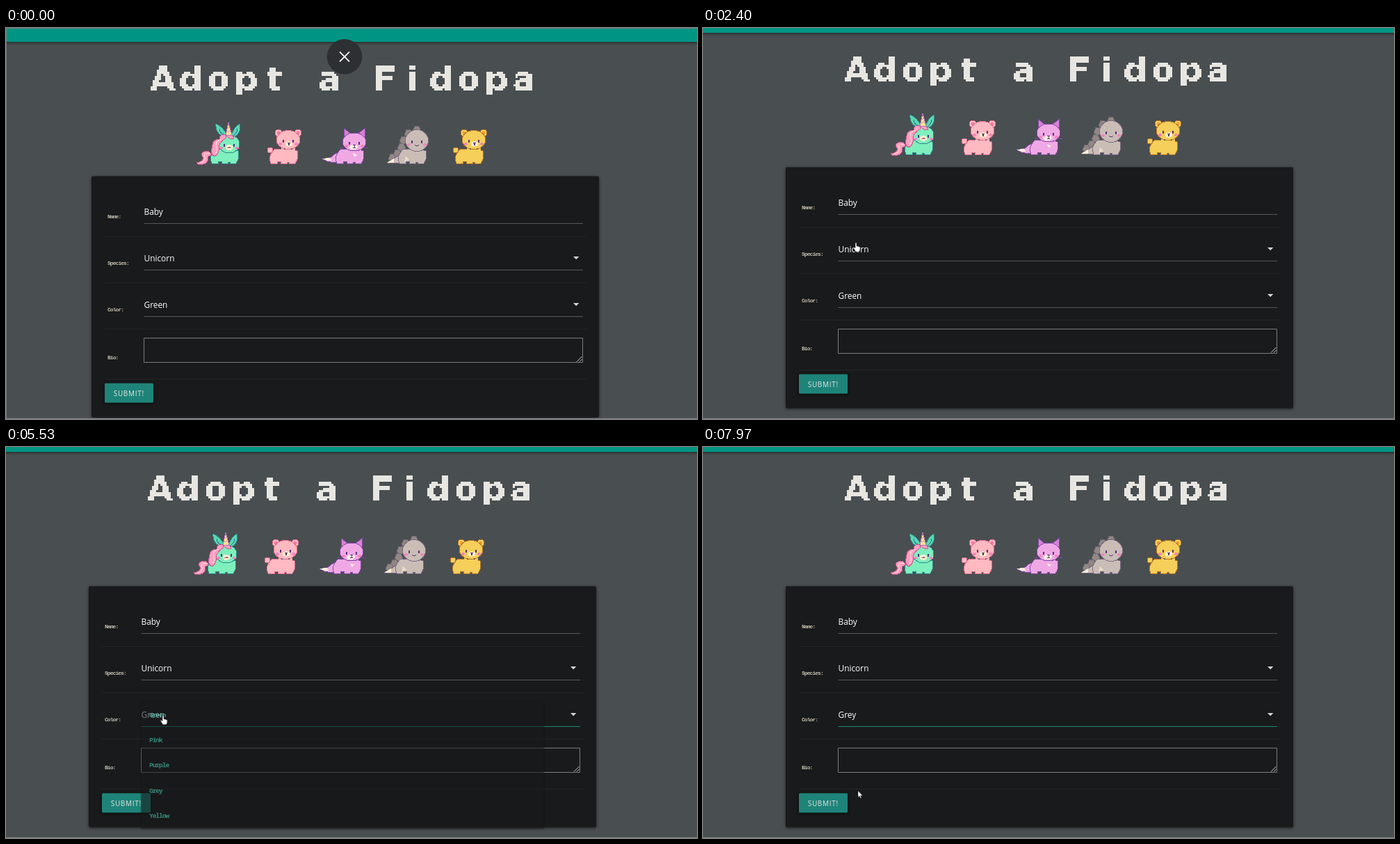
Write an HTML page that moves like this. It is 994 px wide and 563 px high and loops after 8 s.

```html
<!DOCTYPE html>
<html lang="en">
<head>
<meta charset="utf-8">
<title>Adopt a Fidopa</title>
<style>
  html, body { margin: 0; width: 100%; height: 100%; overflow: hidden; background: #494e51; }
  svg { display: block; width: 994px; height: 563px; }
  .title { font: bold 48px "DejaVu Sans", sans-serif; fill: #e8e6e1; text-anchor: middle; }
  .label { font: bold 8px "Liberation Mono", monospace; letter-spacing: -.95px; fill: #c6bfae; }
  .value { font: 11.9px "Open Sans", "Noto Sans", sans-serif; fill: #fff; }
  .item { font: bold 10.4px "Noto Sans Mono", "DejaVu Sans Mono", monospace; letter-spacing: -1.1px; fill: #4fd5c2; }
  .button { font: 10px "Open Sans", "Noto Sans", sans-serif; letter-spacing: .7px; fill: #e8e6e3; }
  .shade { filter: drop-shadow(0 1px 2px #0009); }
  .pet { shape-rendering: crispEdges; }
</style>
</head>
<body>
<svg viewBox="0 0 994 563">
  <filter id="px" x="0" y="0" width="561" height="45" filterUnits="userSpaceOnUse" color-interpolation-filters="sRGB">
    <feFlood x="1" y="1" width="1" height="1" flood-color="#fff"/>
    <feComposite x="0" y="0" width="3" height="3"/>
    <feTile result="grid"/>
    <feComposite in="SourceGraphic" in2="grid" operator="in"/>
    <feComponentTransfer><feFuncA type="discrete" tableValues="0 1"/></feComponentTransfer>
    <feMorphology operator="dilate" radius="1"/>
  </filter>
  <rect width="994" height="563" fill="#494e51"/>
  <g id="page">
    <rect class="shade" x="-20" y="-20" width="1040" height="27" fill="#009483"/>
    <g transform="translate(204 38)"><text id="title" class="title" y="39" filter="url(#px)">Adopt a Fidopa</text></g>
    <g id="pets"></g>
    <rect class="shade" x="119" y="200.5" width="730" height="347" rx="2" fill="#181a1b"/>
    <g id="form"></g>
    <g id="menus"></g>
    <g id="close">
      <circle cx="483" cy="28.3" r="25.3" fill="#2d3033"/>
      <path d="M476 21.3l14 14m0-14l-14 14" stroke="#fff" stroke-width="1.8"/>
    </g>
  </g>
  <path id="edge" d="M.5 563V.5H994" fill="none" stroke="#6f7a7a"/>
  <path d="M0 562.5H994" stroke="#898c8d"/>
  <g id="cursor" fill="#fff" stroke="#151515" stroke-width=".5">
    <path id="hand" d="M-1 1q1-2 2 0v4q3 0 5 1.5v3q-.5 2.5-1.5 3.5h-5q-1-2-3-5q0-1.6 1-1.3l1.5 1.3z"/>
    <path id="arrow" d="M0 0v9.5l2.1-2 1.5 3.2 1.4-.6-1.4-3.1h3z"/>
  </g>
</svg>
<script>
const $ = id => document.getElementById(id);
const clamp = v => Math.max(0, Math.min(1, v));
const text = (cls, x, y, s, id = '') => `<text class="${cls}" x="${x}" y="${y}" id="${id}">${s}</text>`;
const path = (d, fill, line = 'none') => `<path d="${d}" fill="${fill}" stroke="${line}"/>`;
const oval = (x, y, rx, ry, fill, line = 'none') =>
  `<ellipse cx="${x}" cy="${y}" rx="${rx}" ry="${ry}" fill="${fill}" stroke="${line}"/>`;

$('title').setAttribute('x', [...$('title').textContent].map((c, i) => 17.5 + 40 * i).join(' '));

// All pets share body, head and face; coordinates are relative to the head.
function pet(x, y, fill, line, rx, ry, back, front) {
  const feet = 182 - y;
  const body = `M-19 ${feet - 21}Q-30 ${feet - 11}-25 ${feet}h9v-3h5v3h9v-2h3v2h9q6-8 3-18z`;
  const eyes = [-7, 7].map(e => oval(e, 2, 1.5, 2, '#57317e') + oval(e * 1.6, 6, 2.6, 1.8, '#f384bd')).join('');
  return `<g class="pet" transform="translate(${x} ${y})">${back}${path(body, fill, line)}` +
    oval(0, 0, rx, ry, fill, line) + path(`M-10 ${ry - 2}Q0 ${ry + 4} 10 ${ry - 2}V${ry + 5}H-10z`, fill) +
    eyes + front + '</g>';
}
const muzzle = oval(1, 6, 5, 3.6, '#fff0cf') + path('M-1 4h4l-1 2v2h-2v-2z', '#5b3264');
const bear = (x, fill, line, inner) => pet(x, 148, fill, line, 17, 13.5,
  oval(-26, 15, 4, 4, fill, line) + [-14, 14].map(e => oval(e, -10, 5, 5, fill, line) + oval(e, -10, 2.5, 2.5, inner)).join(''),
  muzzle);

const unicorn = pet(317, 154, '#7eefbd', '#318a8b', 15, 13,
  path('M-29 11Q-43 9-38 19Q-36 25-47 27L-45 29Q-31 31-30 21Q-32 16-24 17z', '#ff9fc4', '#c95790') +
  path('M-42 27q9-2 7-8q-3-7 8-5', 'none', '#ffe0bd') +
  path('M-6-10Q-20-14-19-29Q-10-26-3-13z', '#59d9b1', '#318a8b') + path('M6-10Q18-14 15-29Q8-26 3-13z', '#59d9b1', '#318a8b') +
  path('M-14-22q0 6 6 8M12-22q0 5-5 9', 'none', '#2e6da0'),
  path('M-4-13Q-13-16-14-7Q-25-6-24 4Q-29 13-21 18Q-13 14-15 4Q-13-4-5-8z', '#ff9fc4', '#c95790') +
  path('M-4-14q9-2 11 6q-9 2-11-6z', '#ff9fc4', '#c95790') +
  path('M-20 14q5-5 1-11q-1-8 8-10', 'none', '#ffe0d0') +
  path('M-5-13L-1-31L4-13z', '#ffe08a', '#ad75bb') + path('M-4-17l6-2M-3-22l4-2', 'none', '#ec86ca') +
  oval(0, 5, 5.5, 4, '#fff0cf') + path('M-3 5l3-1 3 1v1h-6z', '#a16e91'));

const cat = pet(497, 151, '#f0a8e5', '#854aa9', 17, 13,
  path('M-20 28Q-36 32-46 24Q-35 25-29 18Q-22 13-20 19z', '#f0a8e5', '#854aa9') + path('M-46 24q8 5 14 2l-4-3z', '#fff0dc') +
  path('M-15-4L-15-20L-4-11zM15-4L16-20L4-11z', '#d681d6', '#854aa9'),
  path('M-4 4h6l3 3-4 4h-6l-3-3z', '#fff2e6') + path('M-2 4h4l-2 2v2l-2 1m2-1l2 1', 'none', '#5b3264') +
  path('M-16 8h-4M15 8h5', 'none', '#854aa9') + path('M-2 17l6 1-3 4z', '#fff0dc'));

const spikes = [[-1, -17], [-13, -12], [-20, -2], [-23, 8], [-29, 17], [-36, 23]]
  .map(([x, y]) => path(`M${x - 5} ${y + 4}l3-8 6 1 3 6-6 5z`, '#928783', '#706777')).join('');
const dino = pet(587, 149, '#cabdb6', '#7c6b84', 16.5, 15.5,
  spikes + path('M-20 17Q-29 24-43 32L-18 33z', '#cabdb6', '#7c6b84') + path('M-43 32l10-6v6z', '#fff0d5'),
  path('M-3 6q3 4 6 0', 'none', '#57317e') + path('M-16 22l5 6-7 3z', '#e8d9c8'));

$('pets').innerHTML = unicorn + bear(402, '#ffb9c0', '#e06d91', '#f27ca4') + cat + dino +
  bear(669, '#f5cf59', '#b8752c', '#ef9e33');

const rows = [['Name', 257.5, 'Baby'], ['Species', 325, 'Unicorn'], ['Color', 392, 'Green']];
$('form').innerHTML = rows.map(([name, y, value], i) =>
  text('label', 142, y + 3.2, name + ':') + text('value', 194.5, y - 2, value, 'value' + i) +
  `<path id="line${i}" d="M194.5 ${268.5 + 67 * i}H826"/>` +
  path(`M138 ${287.5 + 66.5 * i}H831`, 'none', '#222526') +
  (i ? path(`M812 ${y - 9}h8.4l-4.2 4.3z`, '#d7d5d2') : '')).join('') +
  text('label', 142, 464.2, 'Bio:') + path('M194.5 433.5H825.5V468.5H194.5z', 'none', '#7b7d7d') +
  path('M817 467.5l7.5-7.5M821 467.5l3.5-3.5', 'none', '#d0d0d0') + path('M138 492.5H831', 'none', '#222526') +
  '<rect class="shade" x="138" y="498.5" width="70" height="28" rx="1.5" fill="#1e8479"/>' +
  text('button', 150.7, 516.8, 'SUBMIT!');

const STEP = 39.75;
const menus = [
  { row: 1, top: 300.5, open: 2455, shut: 4665, items: ['Unicorn', 'Bear', 'Cat', 'Dinosaur'] },
  { row: 2, top: 367, open: 5479, shut: 7665, items: ['Green', 'Pink', 'Purple', 'Grey', 'Yellow'] }
];
$('menus').innerHTML = menus.map((m, i) => `<g id="menu${i}">` +
  `<rect class="shade" width="631.5" height="${STEP * m.items.length}" fill="#18191a"/>` +
  m.items.map((s, k) => text('item', 12.5, STEP * k + 23.5, s)).join('') + '</g>').join('');

const shifts = [[4, 13], [2, 7], [1, 4], [0, 2], [0, 1], [0, 0]];
const trail = [
  [1360, 483, 40], [1600, 385, 150], [1850, 270, 330], [2000, 246, 367], [2120, 233, 325], [2180, 220, 309],
  [3110, 220, 309], [3170, 236, 321], [3380, 236, 321], [3650, 252, 453], [4080, 252, 453], [4110, 240, 383],
  [4200, 228, 301], [4350, 228, 301], [4440, 227, 316], [5010, 227, 316], [5400, 226, 386], [5600, 226, 387],
  [6490, 226, 387], [6520, 233, 401], [7020, 235, 517], [7170, 235, 517], [7440, 221, 503], [7880, 221, 503],
  [7970, 223, 495]
];
function pointer(t) {
  const n = trail.findIndex(k => k[0] > t);
  if (n < 1) return trail[n < 0 ? trail.length - 1 : 0].slice(1);
  const [a, b] = [trail[n - 1], trail[n]], p = (t - a[0]) / (b[0] - a[0]);
  return [1, 2].map(k => a[k] + (b[k] - a[k]) * p);
}

const show = (id, on) => $(id).setAttribute('visibility', on ? 'visible' : 'hidden');
const move = (id, x, y, more = '') => $(id).setAttribute('transform', `translate(${x} ${y})${more}`);

function draw(t) {
  move('page', ...shifts[t < 60 ? 0 : Math.min(5, 1 + Math.floor((t - 60) / 50))]);
  show('edge', t < 60);

  move('close', 0, -60 * clamp((t - 1400) / 250) ** 2);
  show('close', t < 1650);

  $('line0').setAttribute('stroke', '#55595a');
  menus.forEach((m, i) => {
    const rest = 1 - clamp((t - m.open) / 150), left = (1 - clamp((t - m.shut) / 250)) ** 5;
    const scale = (1 - .7 * rest ** 5) * left;
    show('menu' + i, rest < 1 && left > .002);
    move('menu' + i, 194.5, m.top, ` scale(${scale})`);
    $('menu' + i).setAttribute('opacity', (1 - rest ** 2) * left);
    const focused = t >= m.open - 25 && (i || t < menus[1].open - 25);
    $('line' + m.row).setAttribute('stroke', focused ? '#1d8a7d' : '#55595a');
  });
  $('value2').textContent = t < menus[1].shut ? 'Green' : 'Grey';

  const arrow = t < 2180 || t >= 7910;
  move('cursor', ...pointer(t));
  show('hand', t >= 1360 && !arrow);
  show('arrow', t >= 1360 && arrow);
}

const start = performance.now();
function tick() {
  draw((performance.now() - start) % 8000);
  requestAnimationFrame(tick);
}
draw(0);
requestAnimationFrame(tick);
</script>
</body>
</html>
```
